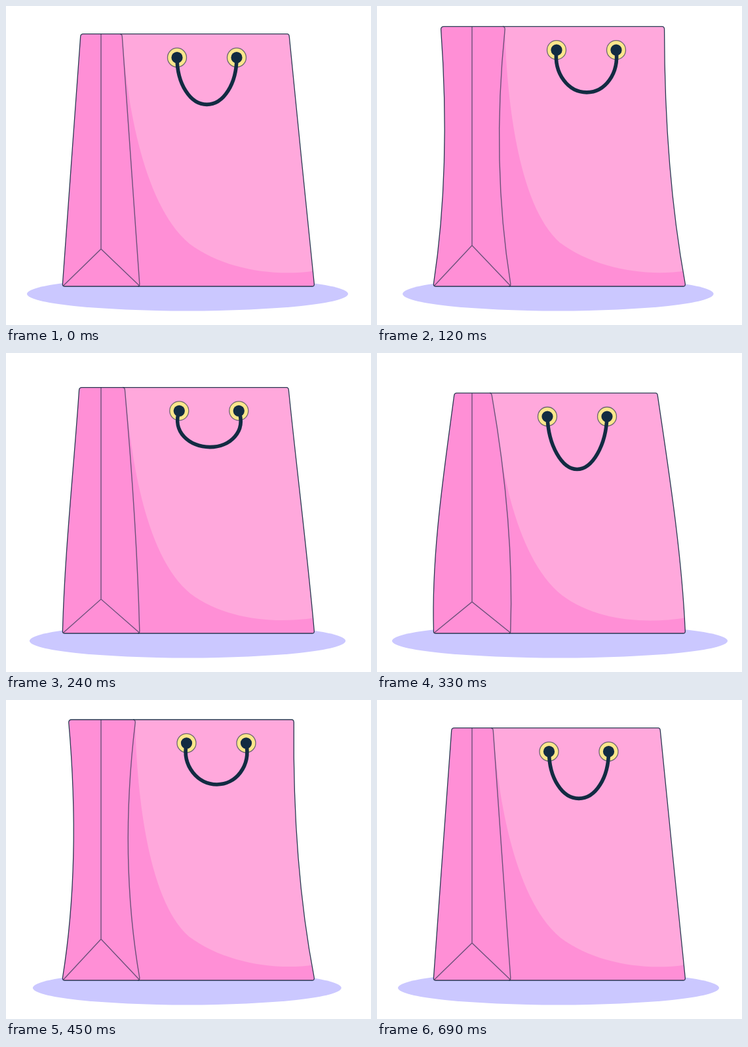
Animation, 557 px wide and 487 px high, one loop 1.05 s. Source, as an HTML page with a canvas:

```html
<!DOCTYPE html>
<html lang="en">
<head>
<meta charset="utf-8">
<title>Bouncing bag</title>
<style>
  html, body { margin: 0; width: 100%; height: 100%; overflow: hidden; background: #fff; }
  canvas { display: block; }
</style>
</head>
<body>
<canvas id="stage" width="557" height="487"></canvas>
<script>
const c = document.getElementById('stage').getContext('2d');
const LOOP = 1050, STEP = 30, FLOOR = 428;
const NAVY = '#122b42', CREASE = 'rgba(18,43,66,.62)', OUTLINE = 'rgba(18,43,66,.9)';
const PINK = '#ff8fd6', LIGHT = '#ffa8dc';

// Bag poses: top edge, apex of the side fold, ring position,
// then top x and two control x for the left, fold and right edges,
// then the shade curve's control points and its joint.
const pose = (top, apex, ring, left, fold, right, shade) =>
  [top, apex, ...ring, ...left, ...fold, ...right, ...shade];
const edges = [[114, 104.7, 95.3], [177, 186, 195], [432, 444.7, 457.3]];
const curve = [183, 130, 205, 300, 280, 363];
const rest = pose(42.7, 371, [261, 78.7], ...edges, curve);
const settled = pose(42.7, 371, [262.5, 78.7], ...edges, curve);
const tall = pose(30, 365, [275.5, 65.8],
  [96, 107, 107], [197, 181.8, 181.8], [439, 438, 445.5], [199, 130, 214, 304, 279, 361]);
const squat = pose(64.8, 381.7, [258.2, 100.6],
  [120.5, 101.4, 80.2], [172.5, 197.6, 211], [426.7, 446.7, 467.2], [184, 152, 206, 311, 283, 371]);

// Rope: depth, side bulge, shoulder height, bottom roundness, sideways sag
const ropeRest = [71.7, 0, 40, 25.5, 0];
const ropeHigh = [52, 13, 30, 32, 1.5];
const ropeLow = [83.8, -3, 46, 22, -.3];

// Floor shadow: centre x, half width
const shadowRest = [277, 245], shadowThin = [276, 233], shadowWide = [279, 256];

const bagKeys = [[0, rest], [150, tall], [300, squat], [450, tall], [645, settled]];
const ropeKeys = [[60, ropeRest], [210, ropeHigh], [360, ropeLow], [510, ropeHigh], [675, ropeRest]];
const shadowKeys = [[30, shadowRest], [180, shadowThin], [330, shadowWide], [480, shadowThin], [690, shadowRest]];

function at(keys, t) {
  if (t <= keys[0][0]) return keys[0][1];
  for (let i = 1; i < keys.length; i++) {
    const [t0, a] = keys[i - 1], [t1, b] = keys[i];
    if (t < t1) {
      const u = (t - t0) / (t1 - t0), k = u * u * (3 - 2 * u);
      return a.map((v, j) => v + (b[j] - v) * k);
    }
  }
  return keys[keys.length - 1][1];
}

function stroke(color, width) {
  c.strokeStyle = color;
  c.lineWidth = width;
  c.stroke();
}

function disc(x, y, r, color) {
  c.beginPath();
  c.arc(x, y, r, 0, 7);
  c.fillStyle = color;
  c.fill();
}

// Edge running down from a rounded top corner to a rounded foot
function edge(top, [x, x1, x2], foot) {
  const h = (FLOOR - top) / 3;
  c.lineTo(x - 3, top);
  c.quadraticCurveTo(x, top, x + .3, top + 4);
  c.bezierCurveTo(x1, top + h, x2, top + 2 * h, foot - .4, FLOOR - 4);
  c.quadraticCurveTo(foot, FLOOR, foot - 3, FLOOR);
}

function panel(top, [x, x1, x2], right, foot) {
  const h = (FLOOR - top) / 3;
  c.beginPath();
  c.moveTo(x + 4, top);
  edge(top, right, foot);
  c.lineTo(89, FLOOR);
  c.quadraticCurveTo(86, FLOOR, 86.4, FLOOR - 4);
  c.bezierCurveTo(x2, top + 2 * h, x1, top + h, x - .3, top + 4);
  c.quadraticCurveTo(x, top, x + 4, top);
  c.closePath();
}

function drawBag(p) {
  const [top, apex] = p;
  const left = p.slice(4, 7), fold = p.slice(7, 10), right = p.slice(10, 13);
  const [ax, ay, bx, by, jx, jy] = p.slice(13);

  panel(top, left, right, 470.7);
  c.fillStyle = PINK;
  c.fill();
  c.save();
  c.clip();
  c.beginPath();
  c.moveTo(fold[0], top);
  c.bezierCurveTo(ax, ay, bx, by, jx, jy);
  c.bezierCurveTo(jx + 52, jy + 39, 410, 414, 472, 404);
  c.lineTo(472, top);
  c.fillStyle = LIGHT;
  c.fill();
  c.restore();

  panel(top, left, fold, 204.2);
  c.fillStyle = PINK;
  c.fill();

  c.beginPath();
  edge(top, fold, 204.2);
  c.moveTo(145, top);
  c.lineTo(145, apex);
  c.moveTo(87.5, FLOOR - 1);
  c.lineTo(145, apex);
  c.lineTo(203.5, FLOOR - 1);
  stroke(CREASE, 1.4);

  panel(top, left, right, 470.7);
  stroke(OUTLINE, 1.3);
}

function drawHandle(x, y, [depth, bulge, shoulder, round, sag]) {
  const end = x + 91, mid = x + 45.5 + sag;
  for (const rx of [x, end]) {
    disc(rx, y, 14.5, '#fde68c');
    stroke(CREASE, 1.3);
    disc(rx, y, 8.6, NAVY);
  }
  c.beginPath();
  c.moveTo(x, y);
  c.bezierCurveTo(x - bulge, y + shoulder, mid - round, y + depth, mid, y + depth);
  c.bezierCurveTo(mid + round, y + depth, end + bulge, y + shoulder, end, y);
  stroke(NAVY, 5.6);
}

function draw(now) {
  const t = Math.floor(now % LOOP / STEP) * STEP;
  const bag = at(bagKeys, t), [x, halfWidth] = at(shadowKeys, t);
  c.clearRect(0, 0, 557, 487);
  c.beginPath();
  c.ellipse(x, 439.5, halfWidth, 26, 0, 0, 7);
  c.fillStyle = '#cbc8ff';
  c.fill();
  drawBag(bag);
  drawHandle(bag[2], bag[3], at(ropeKeys, t));
}

const start = performance.now();
function tick() {
  draw(performance.now() - start);
  requestAnimationFrame(tick);
}
tick();
</script>
</body>
</html>
```
